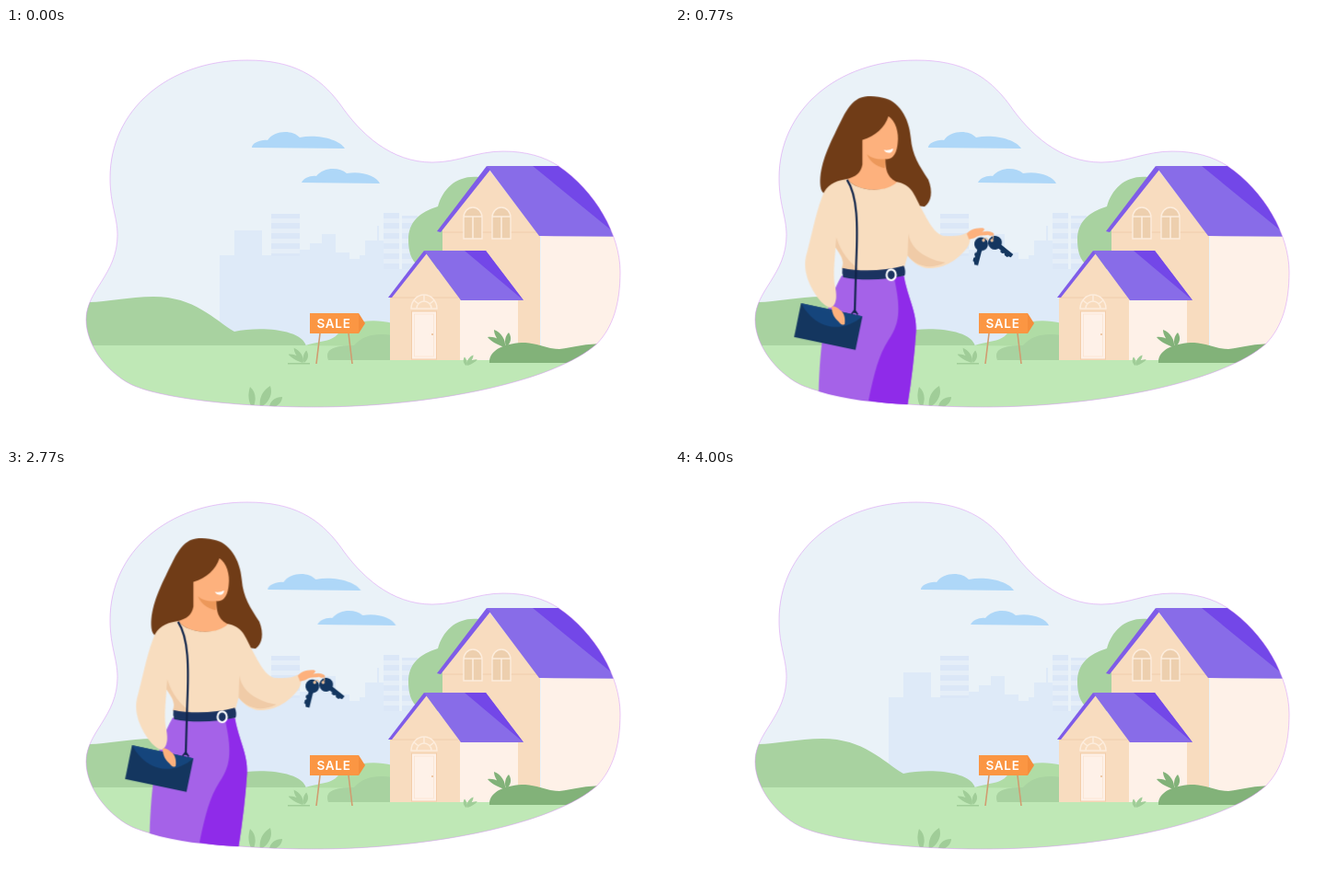
Write an HTML page that moves like this. It is 720 px wide and 450 px high and loops after 4030 ms.

```html
<!DOCTYPE html>
<html lang="en">
<head>
<meta charset="utf-8">
<title>House for sale</title>
<style>
  html, body { margin: 0; width: 100%; height: 100%; overflow: hidden; background: #fff; }
  svg { display: block; width: 100vw; height: 100vh; }
  .clouds { animation: drift 4030ms cubic-bezier(.37, 0, .63, 1) infinite; }
  .woman { animation: pop 4030ms cubic-bezier(.37, 0, .63, 1) infinite; }
  .keys { transform-origin: 373px 186px; animation: swing 4030ms cubic-bezier(.37, 0, .63, 1) infinite; }
  @keyframes drift {
    0%, 100% { transform: translateX(0); }
    50% { transform: translateX(25px); }
  }
  @keyframes pop {
    0%, .5% { transform: scale(0); }
    3.2% { transform: scale(1.2); }
    5.6% { transform: scale(.86); }
    8.1% { transform: scale(1.095); }
    10.6% { transform: scale(.937); }
    13.1%, 80.6% { transform: scale(1); }
    84.4% { transform: scale(.94); }
    88.1% { transform: scale(1.1); }
    91.8% { transform: scale(.847); }
    95.5% { transform: scale(1.17); }
    99.2%, 100% { transform: scale(0); }
  }
  @keyframes swing {
    0%, 13.8% { transform: rotate(0); }
    33.5% { transform: rotate(4deg); }
    53.2%, 100% { transform: rotate(0); }
  }
</style>
</head>
<body>
<svg viewBox="0 0 720 450">
  <defs>
    <path id="blob" d="M87 317C87 285 121 268 121 225C121 205 113 192 113 163C113 90 175 35 262 35C312 35 340 52 363 83C385 115 418 146 463 146C492 146 510 134 540 134C565 134 585 140 600 150C640 177 667 225 667 265C667 300 659 325 642 343C595 385 460 412 335 412C250 412 165 402 135 387C110 374 87 345 87 317Z"/>
    <clipPath id="inside"><use href="#blob"/></clipPath>
    <pattern id="floors" width="40" height="11" y="201" patternUnits="userSpaceOnUse">
      <rect width="40" height="11" fill="#e5eef8"/>
      <rect width="40" height="6" fill="#dbe7f7"/>
    </pattern>
    <g id="window">
      <path d="M497 229V206A10 11 0 0 1 517 206V229Z" fill="#edcfae" stroke="#fdeddd" stroke-width="1.4"/>
      <path d="M497 205H517M507 205V229" fill="none" stroke="#fdeddd" stroke-width="1.6"/>
    </g>
    <path id="sprig" d="M0 0C-8-3-15-7-18-11C-9-12-2-7 0 0ZM1 0C-7-7-11-13-11-19C-3-16 2-8 1 0ZM2 0C0-7 1-12 5-16C9-10 7-4 2 0Z"/>
    <g id="key">
      <path d="M-3 6H3V28H-2L-3 25L-5 24V20L-3 18L-5 16V13L-3 12Z" fill="#14365f"/>
      <circle r="9" fill="#14365f"/>
    </g>
  </defs>

  <g clip-path="url(#inside)">
    <rect width="720" height="450" fill="#eaf2f8"/>

    <path d="M232 350V247H248V220H278V247H288V241H330V234H343V224H358V244H373V251H384V247H390V231H403V215H405V231H410V262H447V350Z" fill="#deeaf8"/>
    <path d="M288 202H319V248H288ZM410 201H427V262H410ZM430 204H447V262H430Z" fill="url(#floors)"/>

    <g class="clouds" fill="#aed7f8">
      <path d="M267 130C267 125 277 121 284 122C291 111 311 110 319 119C338 115 362 121 368 131Z"/>
      <path d="M321 168C323 163 331 160 337 161C345 151 362 151 370 158C386 155 403 161 406 169Z"/>
    </g>

    <path d="M80 297C98 301 128 292 160 292C205 292 226 317 248 330C275 324 322 327 326 346H80Z" fill="#a8d2a0"/>
    <rect x="80" y="345" width="600" height="75" fill="#bfe8b6"/>
    <path d="M325 345C340 340 348 342 358 335C372 319 395 315 420 321V346Z" fill="#b0dca5"/>
    <path d="M350 361C346 350 354 345 378 345C387 334 402 331 420 334V361Z" fill="#a8d2a0"/>
    <path d="M476 262H455C441 257 437 245 437 230C437 211 449 200 469 194C475 172 493 157 520 163V256Z" fill="#a8d2a0"/>

    <!-- large house -->
    <path d="M523 152L580 226V361H474V217Z" fill="#f8dcbf"/>
    <path d="M581 226H680V349H581Z" fill="#fef1e8"/>
    <path d="M474 222H579" stroke="#f0cdac"/>
    <path d="M522 150H600L680 227L579 226Z" fill="#886ce8"/>
    <path d="M572 150H610L680 227L660 222Z" fill="#7347e8"/>
    <path d="M522 150L468 221L472 222L526 154Z" fill="#7f5ce8"/>
    <use href="#window"/>
    <use href="#window" x="31"/>

    <!-- small house -->
    <path d="M455 243L493 296V361H417V291Z" fill="#f8dcbf"/>
    <path d="M493 296H556V361H493Z" fill="#fef1e8"/>
    <path d="M417 293H491" stroke="#f0cdac"/>
    <path d="M454 242H521L562 296H494Z" fill="#886ce8"/>
    <path d="M498 242H521L562 296Z" fill="#7347e8"/>
    <path d="M454 242L415 293L419 293L457 245Z" fill="#7f5ce8"/>
    <g fill="#f8dcbf" stroke="#fdeddd" stroke-width="1.5">
      <path d="M440 305A14 15 0 0 1 468 305Z"/>
      <path d="M446 305A8 8 0 0 1 462 305M454 297V290M448 300L443 296M460 300L465 296" fill="none"/>
    </g>
    <rect x="440.5" y="308" width="27" height="52" fill="#fef1e8" stroke="#f3cdaa"/>
    <rect x="443.5" y="311" width="21" height="46" fill="none" stroke="#fae3d0" stroke-width=".8"/>
    <circle cx="463" cy="333" r="1" fill="#eabb91"/>

    <g fill="#82b279">
      <path d="M525 364C524 350 542 342 564 342C578 343 588 349 601 349C616 347 630 343 650 343V364Z"/>
      <use href="#sprig" transform="translate(541 347)"/>
    </g>
    <g fill="#a0cd98">
      <path d="M306 364H330V365.500H306Z"/>
      <use href="#sprig" transform="translate(322 364) scale(.85)"/>
      <use href="#sprig" transform="translate(501 367) scale(-.6 .6)"/>
      <path d="M268 414C262 405 263 397 265 390C272 396 272 405 268 414ZM276 413C274 401 280 393 287 389C290 398 286 407 276 413ZM286 413C286 406 292 401 300 401C300 407 294 413 286 413Z"/>
    </g>

    <path d="M341 332L337 365M372 332L376 365" stroke="#d19c70" stroke-width="1.6"/>
    <path d="M330 310H383V332H330Z" fill="#fb9643"/>
    <path d="M383 310L390 321L383 332Z" fill="#f58d3b"/>
    <text x="356" y="326" text-anchor="middle" font-family="Inter, 'Open Sans', sans-serif" font-size="13.5" font-weight="600" letter-spacing=".7" fill="#fff">SALE</text>
  </g>
  <use href="#blob" fill="none" stroke="#d894f3" stroke-width=".7" opacity=".75"/>

  <g transform="translate(206 400)"><g class="woman"><g transform="scale(.8333) translate(-206 -400)">
    <!-- hair, face, neck -->
    <path d="M210 9C187 10 179 34 167 58C154 84 145 110 149 130C151 136 156 139 160 138L284 153C293 147 295 133 289 118C277 99 268 87 266 63C264 36 249 14 230 11C222 9 215 9 210 9Z" fill="#703c17"/>
    <path d="M237 35C232 50 220 61 203 66V98C201 109 194 114 183 117C197 135 235 135 250 122C239 117 233 111 233 91C244 92 248 82 249 70C251 56 246 41 237 35Z" fill="#fdb17d"/>
    <path d="M209 85C216 91 224 92 233 91L232 103C220 100 213 94 209 85Z" fill="#ec985a"/>
    <path d="M231 79C235 80 239 79 243 77C243 84 234 85 231 79Z" fill="#fff"/>

    <!-- skirt -->
    <path d="M176 243L257 242C262 272 274 290 273 315C271 346 267 380 262 411C220 409 180 405 146 394C148 336 153 282 176 243Z" fill="#a562e8"/>
    <path d="M244 244H257C262 272 274 290 273 315C271 346 267 380 262 411C245 411 228 409 211 406C218 372 224 347 237 327C254 303 252 282 244 244Z" fill="#8f2be9"/>

    <!-- sweater and belt -->
    <path d="M183 117C197 135 235 135 248 121C266 124 270 136 278 152C291 176 296 186 308 191C320 192 332 192 339 187C344 193 344 199 341 204C329 223 306 236 285 233C275 231 267 224 262 217L257 234C230 240 202 240 176 234C181 223 173 215 168 206C167 224 164 244 168 260C170 271 169 281 162 285C148 282 135 258 131 245C127 231 128 222 131 212C138 185 144 154 153 134C160 122 171 119 183 117Z" fill="#f8ddbf"/>
    <path d="M169 193C175 213 186 226 200 236C192 237 184 236 176 234C181 223 174 215 168 206ZM263 188C265 203 278 220 311 226C292 236 273 231 262 217Z" fill="#f0cba7"/>
    <path d="M177 233C200 238 232 237 257 230Q260 237 258 243C232 249 202 250 178 245Q176 239 177 233Z" fill="#1b3360"/>
    <ellipse cx="240.500" cy="242" rx="6" ry="7" fill="#1b3360" stroke="#fff" stroke-width="2.6"/>

    <!-- bag -->
    <path d="M183 118C197 139 197 178 195 224L193 292" fill="none" stroke="#10244a" stroke-width="2.6"/>
    <path d="M123 279L203 296L194 340L114 323Z" fill="#14365f"/>
    <path d="M123 279L203 296C180 316 145 318 123 279Z" fill="#15457c"/>
    <path d="M189 293L193 288L197 294" fill="none" stroke="#10244a" stroke-width="2"/>
    <path d="M163 283C168 283 171 285 174 288C179 291 181 298 180 306C178 309 174 306 172 303C167 299 163 293 163 283Z" fill="#fdb17d"/>

    <!-- hand with keys -->
    <path d="M339 188C345 182 351 181 360 181C364 182 361 185 359 186C365 184 372 185 374 188C375 191 370 192 367 190C361 191 355 190 351 193C348 195 345 195 342 196Z" fill="#fdb17d"/>
    <g class="keys">
      <use href="#key" transform="translate(358 202) rotate(14)"/>
      <use href="#key" transform="translate(376 200) rotate(-52)"/>
      <g fill="#f2c9a4">
        <circle cx="361" cy="197" r="2"/>
        <circle cx="372" cy="197" r="2"/>
      </g>
      <path d="M361 197C362 193 366 193 367 197M372 197C374 195 374 192 373 188" fill="none" stroke="#e9b184" stroke-width="1.2"/>
    </g>
  </g></g></g>
</svg>
</body>
</html>
```
